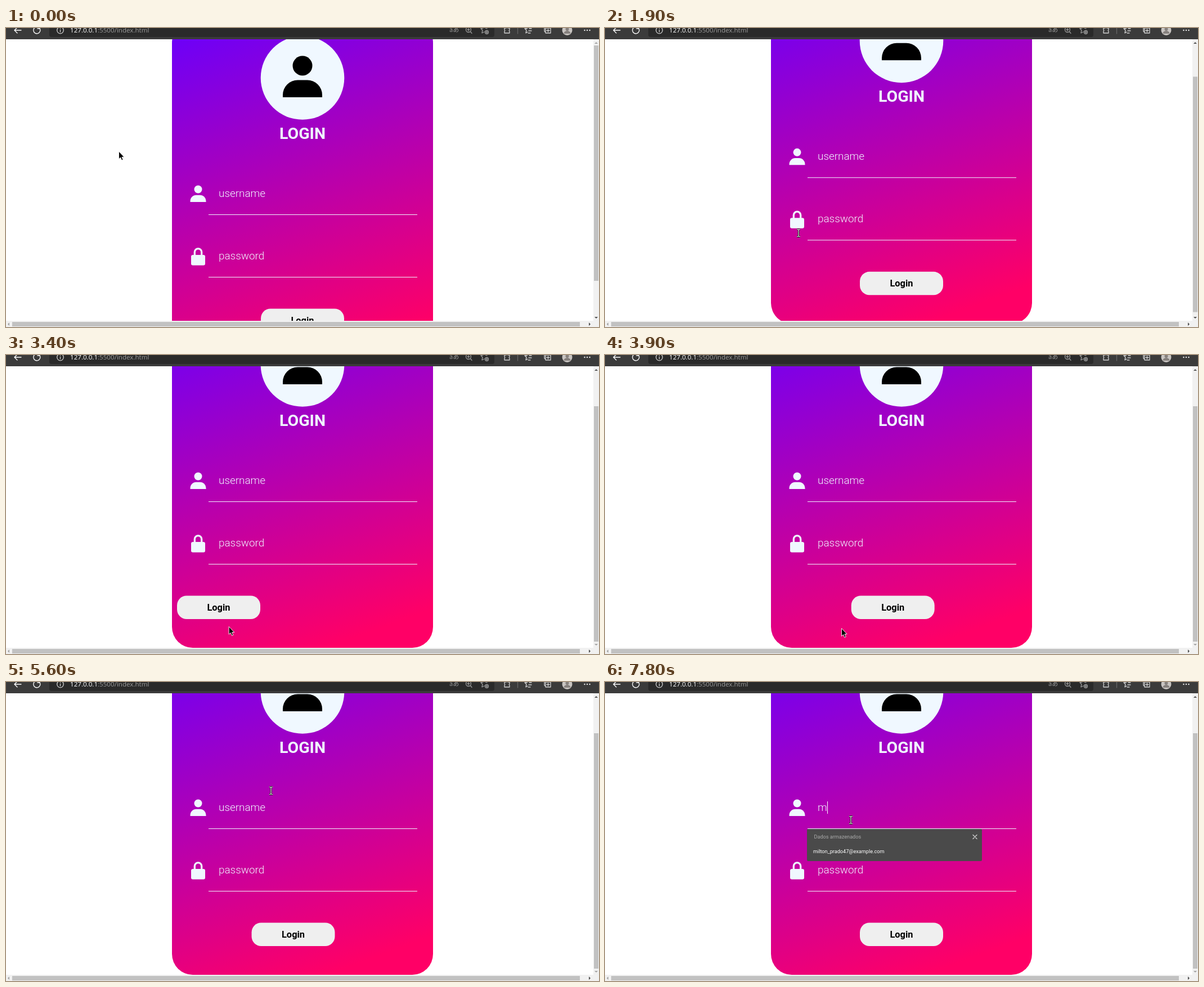
An HTML page for the animation above (8 s loop, 1054 by 531 pixels).

```html
<!DOCTYPE html>
<html lang="pt">
<head>
<meta charset="utf-8">
<title>Login</title>
<style>
html, body { margin: 0; width: 100%; height: 100%; overflow: hidden; background: #fff; }
svg { display: block; }
text { font-family: Roboto, sans-serif; }
.field { font-size: 18.9px; font-weight: 300; fill: #f0f8ff; }
.small { font-size: 9.15px; }
.bold { font-weight: 700; text-anchor: middle; }
.line { fill: none; stroke: #d2d2d2; stroke-width: 1.3; stroke-linecap: round; stroke-linejoin: round; }
</style>
</head>
<body>
<svg width="1054" height="531" viewBox="0 0 1054 531">
  <defs>
    <linearGradient id="fade" gradientUnits="userSpaceOnUse" x1="403" y1="-51" x2="651" y2="631">
      <stop stop-color="#60f"/><stop offset=".91" stop-color="#f06"/>
    </linearGradient>
    <clipPath id="view"><path d="M0 20H1044V520H0Z"/></clipPath>
    <g id="person">
      <circle r="17.5"/>
      <path d="M-35 56V52A26.5 26.5 0 0 1-8.5 25.5H8.5A26.5 26.5 0 0 1 35 52V56Z"/>
    </g>
    <path id="beam" d="M-3-6.5H-1.5L0-5.5 1.5-6.5H3M0-5.5V5.5M-3 6.5H-1.5L0 5.5 1.5 6.5H3"/>
  </defs>

  <g clip-path="url(#view)">
    <g id="page">
      <rect x="295" y="-11" width="464" height="602" rx="37" fill="url(#fade)"/>
      <circle cx="527" cy="88.5" r="74.3" fill="#f0f8ff"/>
      <use href="#person" x="527" y="67"/>
      <text class="bold" x="527" y="197" font-size="28.5" fill="#f0f8ff">LOGIN</text>
      <g fill="#f0f8ff">
        <use href="#person" transform="translate(341.5 286.5) scale(.4)"/>
        <rect x="329" y="403" width="25" height="18.5" rx="3"/>
        <path d="M335.3 404V398A6.2 6.2 0 0 1 347.7 398V404" fill="none" stroke="#f0f8ff" stroke-width="3.3"/>
        <path d="M360 331H731V332H360ZM360 442H731V443H360Z"/>
      </g>
      <text class="field" id="user" x="378" y="300">username</text>
      <path id="caret" d="M395.5 283V305" stroke="#fff"/>
      <text class="field" x="378" y="411">password</text>
      <g id="button">
        <rect x="453" y="498.5" width="148" height="41.5" rx="17" fill="#efefef"/>
        <text class="bold" x="527" y="525" font-size="16.4">Login</text>
      </g>
    </g>
  </g>

  <g id="menu">
    <rect x="359" y="261" width="311" height="57" rx="2" fill="#4a4a4a"/>
    <text class="small" x="371.5" y="278" fill="#aaa">Dados armazenados</text>
    <text class="small" x="370" y="304" fill="#fff">milton_prado47@example.com</text>
    <path class="line" d="M654 271.5L661 278.5M661 271.5L654 278.5"/>
  </g>

  <path d="M1044 20H1054V531H0V520H1044Z" fill="#f1f1f1"/>
  <rect id="vthumb" x="1045" y="31" width="8" height="418" fill="#c1c1c1"/>
  <rect id="hthumb" x="11" y="522" width="1009" height="8"/>
  <path id="up" d="M1046 28H1052L1049 25Z"/>
  <path id="down" d="M1046 513H1052L1049 516Z"/>
  <path d="M6 523V529L3 526Z" fill="#a3a3a3"/>
  <path d="M1036 523V529L1039 526Z" fill="#505050"/>

  <rect width="1054" height="20" fill="#3b3b3b"/>
  <rect x="77" y="-12" width="791" height="28" rx="4" fill="#2a2a2a"/>
  <text x="114" y="8" font-size="11.6" style="font-family:'Open Sans',sans-serif" fill="#9c9c9c"><tspan fill="#fff">127.0.0.1</tspan>:5500/index.html</text>
  <g class="line">
    <path stroke="#fff" d="M27 4H15M20-1L15 4 20 9M60 1A6 6 0 1 1 55-2M60-3V1H56"/>
    <circle cx="96.5" cy="4" r="5.8"/><path d="M96.5 3.5V7M96.5 1V1.2"/>
    <g stroke="#999">
      <circle cx="822" cy="3" r="4.5"/><path d="M825.5 6.5L828 9.5M820 3H824M822 1V5"/>
      <path d="M855 1L852 0 850-4 848 0 844 1 847 4 846 9 850 7"/><circle cx="854.5" cy="7.5" r="3"/><path d="M853 7.5H856M854.5 6V9"/>
    </g>
    <path d="M886 0H889A2 2 0 0 1 892 0H895V3A2 2 0 0 0 895 6V9H886V6A2 2 0 0 0 886 3Z"/>
    <path d="M909.5-4V10" stroke="#666"/>
    <path d="M922 1H926L928-3M930 1H934M929 5H934M928 9H932M922 1L925 4 924 9 927 7"/>
    <path d="M957-4V5A2 2 0 0 0 959 7M960-3H966V0H968V9H959V0H966M963.5 2V7M961 4.5H966"/>
  </g>
  <text x="788" y="7" font-size="11" fill="#999" style="font-family:'Noto Sans CJK JP','Noto Sans CJK',sans-serif">aあ</text>
  <circle cx="997.5" cy="4" r="9" fill="#c9c5c2"/>
  <g fill="#85807d"><circle cx="997.5" cy="2" r="3"/><path d="M991.5 10A6 5 0 0 1 1003.5 10Z"/></g>
  <g fill="#eee"><circle cx="1028.5" cy="4" r="1.2"/><circle cx="1033" cy="4" r="1.2"/><circle cx="1037.5" cy="4" r="1.2"/></g>

  <path id="arrow" d="M0 0V13.8L3.1 11 5.2 16 7.6 15 5.5 10.2H9.6Z" stroke="#fff" stroke-width=".9"/>
  <g id="ibeam" fill="none">
    <use href="#beam" stroke="#222" stroke-width="3"/>
    <use href="#beam" stroke="#eee" stroke-width="1.1"/>
  </g>
</svg>
<script>
const $ = id => document.getElementById(id);
const LOOP = 8000, SCROLL = 71, STEP = 149, DODGE_MS = 200;

// Turning points of the pointer: [time, x, y]
const path = [
  [0, 200.5, 219], [600, 430, 296], [1000, 407, 350], [1200, 407, 399], [1900, 344, 364],
  [2200, 400, 455], [2400, 347.5, 476], [3900, 420.5, 485.5], [4000, 614, 482],
  [4600, 610, 512], [5200, 711, 435], [5600, 471, 193], [6200, 440, 260], [6500, 437, 245]
];

// Times at which the button flees, left and right in turn, and at last returns home.
const flips = [2100, 2200, 2388, 3406, 3580, 3864, 3916, 4090, 4575, 4786, 5000, 5496];

const clamp = p => Math.min(1, Math.max(0, p));
const easeOut = (p, power) => 1 - (1 - clamp(p)) ** power;
const mix = (a, b, p) => a + (b - a) * p;

function pointerAt(t) {
  const i = path.findLastIndex(k => k[0] <= t);
  const [t0, x0, y0] = path[i], [t1, x1, y1] = path[i + 1] || [LOOP, x0, y0];
  const p = (t - t0) / (t1 - t0);
  return [mix(x0, x1, p), mix(y0, y1, p)];
}

function buttonShift(t) {
  const i = flips.findLastIndex(f => f <= t);
  const side = n => n < 0 || n === flips.length - 1 ? 0 : n % 2 ? 1 : -1;
  return i < 0 ? 0 : STEP * mix(side(i - 1), side(i), easeOut((t - flips[i]) / DODGE_MS, 3));
}

const move = (id, x, y) => $(id).setAttribute('transform', `translate(${x} ${y})`);
const show = (id, on) => $(id).setAttribute('visibility', on ? 'visible' : 'hidden');
const fill = (id, color) => $(id).setAttribute('fill', color);

function draw(time) {
  // The picture advances ten times a second and rests for a while after the scroll.
  let t = Math.floor(time / 100) * 100;
  if (t > 2400 && t < 3400) t = 2400;

  const p = clamp((t - 1200) / 900);
  const scroll = SCROLL * easeOut(p, 1.72);
  move('page', 0, -scroll);
  move('vthumb', 0, scroll * 60 / SCROLL);
  fill('up', p > 0 ? '#505050' : '#a3a3a3');
  fill('down', p < 1 ? '#505050' : '#a3a3a3');
  fill('hthumb', t === 4600 ? '#a8a8a8' : '#c1c1c1');

  move('button', buttonShift(t), 0);

  const typed = t >= 6800;
  $('user').textContent = typed ? 'm' : 'username';
  show('menu', typed);
  show('caret', typed && (t < 7100 || t >= 7800));

  const beam = t >= 1000 && t < 2200 || t >= 5400;
  const [x, y] = pointerAt(t);
  show('arrow', !beam);
  show('ibeam', beam);
  move(beam ? 'ibeam' : 'arrow', x, y);
}

const start = performance.now();
function tick() {
  draw((performance.now() - start) % LOOP);
  requestAnimationFrame(tick);
}
tick();
</script>
</body>
</html>
```
